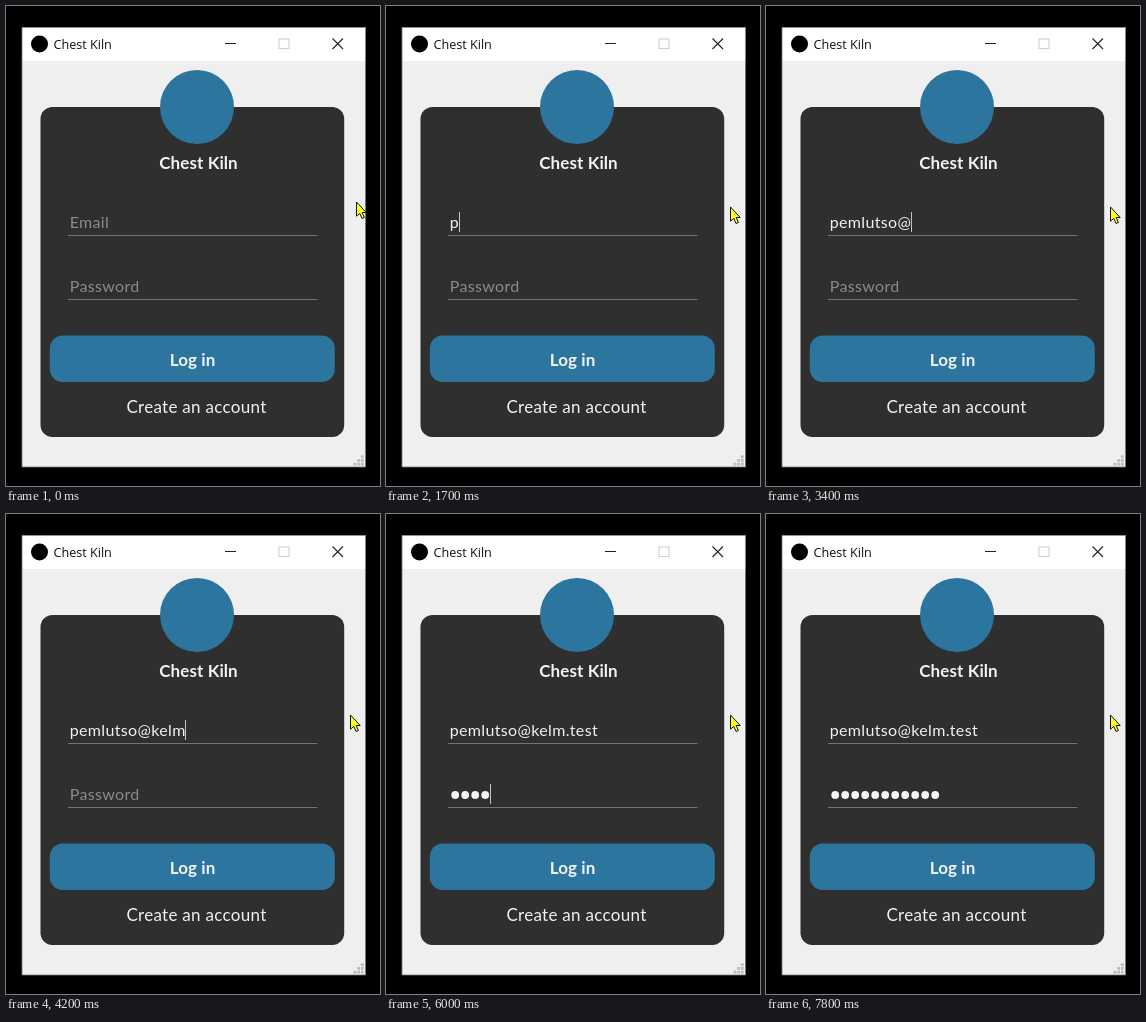
Recreate the animation shown at these times as an HTML page. Size 374 px wide and 480 px high, loop 8000 ms.

```html
<!DOCTYPE html>
<html lang="en">
<head>
<meta charset="utf-8">
<title>Login form</title>
<style>
  html, body { margin: 0; width: 100%; height: 100%; overflow: hidden; background: #000; }
  svg { display: block; width: 374px; height: 480px; }
  text { font-family: Lato, sans-serif; fill: #f2f2f2; white-space: pre; }
  .bar { font: 12.6px "Open Sans", sans-serif; fill: #111; }
  .big { font-size: 17px; text-anchor: middle; letter-spacing: .3px; }
  .bold { font-weight: 700; letter-spacing: .1px; }
  .field { font-size: 16px; letter-spacing: .35px; }
  .hint { fill: #8b8b8b; }
</style>
</head>
<body>
<svg viewBox="0 0 374 480">
  <rect width="374" height="480"/>
  <rect x="16" y="21" width="343.5" height="440" fill="#efefef"/>
  <rect x="16" y="21" width="343.5" height="34" fill="#fff"/>
  <rect x="16" y="21.5" width="343.5" height="439.5" fill="none" stroke="#777" stroke-width=".8"/>
  <circle cx="33.5" cy="38" r="8.5"/>
  <text class="bar" x="47.5" y="43">Chest Kiln</text>
  <g fill="none" stroke="#222" stroke-width="1.1">
    <path d="M219 37.5h11M326.500 32.500l10.500 10.500m0-10.500l-10.500 10.500"/>
    <rect x="273" y="33" width="10" height="9.5" stroke="#d0d0d0"/>
  </g>
  <g id="grip" fill="#bdbdbd"></g>

  <rect x="34.5" y="101" width="303.7" height="330" rx="12" fill="#2f2f2f"/>
  <circle cx="191" cy="101" r="37" fill="#2c759e"/>
  <text class="big bold" x="192.500" y="163">Chest Kiln</text>
  <path d="M62 229.500h249.500M62 293.500h249.500" stroke="#747474"/>
  <rect x="43.800" y="329.500" width="285" height="46.500" rx="13" fill="#2c759e"/>
  <text class="big bold" x="186.500" y="360">Log in</text>
  <text class="big" x="190.500" y="407">Create an account</text>

  <text id="emailHint" class="field hint" x="63.700" y="222">Email</text>
  <text id="passHint" class="field hint" x="63.700" y="286">Password</text>
  <text id="email" class="field" x="63.700" y="222"></text>
  <g id="dots" fill="#f4f4f4"></g>
  <rect id="caret" width="1" height="20" fill="#c4c4c4"/>

  <path id="arrow" d="M.5 0V14.200L3.800 11.400 6 16.500 8.400 15.500 6.200 10.500H10.200Z" fill="#ffff1a" stroke="#111"/>
  <g id="beam" fill="none">
    <path d="M-3.500-7.500h7m-3.500 0v15m-3.500 0h7" stroke="#8d8d68" stroke-width="2.800"/>
    <path d="M-3-7.500h6m-3 0v15m-3 0h6" stroke="#080808" stroke-width="1.300"/>
  </g>
</svg>
<script>
const LOOP = 8000, STEP = 100;
const NAME = 'pemlutso@', DOMAIN = 'kelm.test', PASS_LENGTH = 11;
const FOCUS = 1000, TAB = 5000, CARET_OFF = 7800;

// Pointer key points: time, x, y
const path = [
  [0, 350, 196], [100, 362, 163], [500, 288, 207],
  [800, 53, 356], [1000, 100, 214], [1300, 344, 201]
];

const $ = id => document.getElementById(id);
const add = (parent, tag, attrs) => {
  const el = document.createElementNS('http://www.w3.org/2000/svg', tag);
  for (const key in attrs) el.setAttribute(key, attrs[key]);
  return parent.appendChild(el);
};
const show = (el, on) => el.setAttribute('visibility', on ? 'visible' : 'hidden');
const place = (el, x, y) => el.setAttribute('transform', `translate(${x} ${y})`);

// Keys pressed by time t; a slowdown above 1 makes typing start fast and end slow
function typed(t, from, to, count, slowdown = 1) {
  if (t < from) return 0;
  const u = Math.min(1, (t - from) / (to - from));
  return 1 + Math.floor(u ** (1 / slowdown) * (count - 1) + 1e-6);
}

function pointer(t) {
  const next = path.findIndex(p => p[0] > t);
  if (next < 0) return path.at(-1).slice(1);
  const [t0, x0, y0] = path[next - 1], [t1, x1, y1] = path[next];
  const u = (t - t0) / (t1 - t0);
  return [x0 + (x1 - x0) * u, y0 + (y1 - y0) * u];
}

for (let row = 0; row < 3; row++)
  for (let col = 2 - row; col < 3; col++)
    add($('grip'), 'rect', { x: 347.5 + col * 3.7, y: 449.3 + row * 3.7, width: 2.8, height: 2.8 });

const dots = Array.from({ length: PASS_LENGTH }, (_, i) =>
  add($('dots'), 'circle', { cx: 69.2 + i * 10, cy: 281, r: 3.9 }));

function draw(time) {
  const t = Math.floor(time / STEP) * STEP;
  const letters = typed(t, 1700, 3400, NAME.length, 1.9) + typed(t, 3700, 4900, DOMAIN.length);
  const hidden = typed(t, 5600, 7200, PASS_LENGTH, 1.2);
  const email = $('email');
  email.textContent = (NAME + DOMAIN).slice(0, letters);
  show($('emailHint'), !letters);
  show($('passHint'), !hidden);
  dots.forEach((dot, i) => show(dot, i < hidden));

  const width = letters ? email.getComputedTextLength() : 0;
  if (t < TAB) place($('caret'), Math.floor(63.7 + width), 206);
  else place($('caret'), 64 + hidden * 10, 270);
  show($('caret'), t >= FOCUS && t < CARET_OFF);

  const [x, y] = pointer(t);
  const overField = x > 62 && x < 311 && y > 200 && y < 230;
  place($('arrow'), x, y);
  place($('beam'), x, y);
  show($('arrow'), !overField);
  show($('beam'), overField);
}

const start = performance.now();
function tick() {
  draw((performance.now() - start) % LOOP);
  requestAnimationFrame(tick);
}
tick();
</script>
</body>
</html>
```
